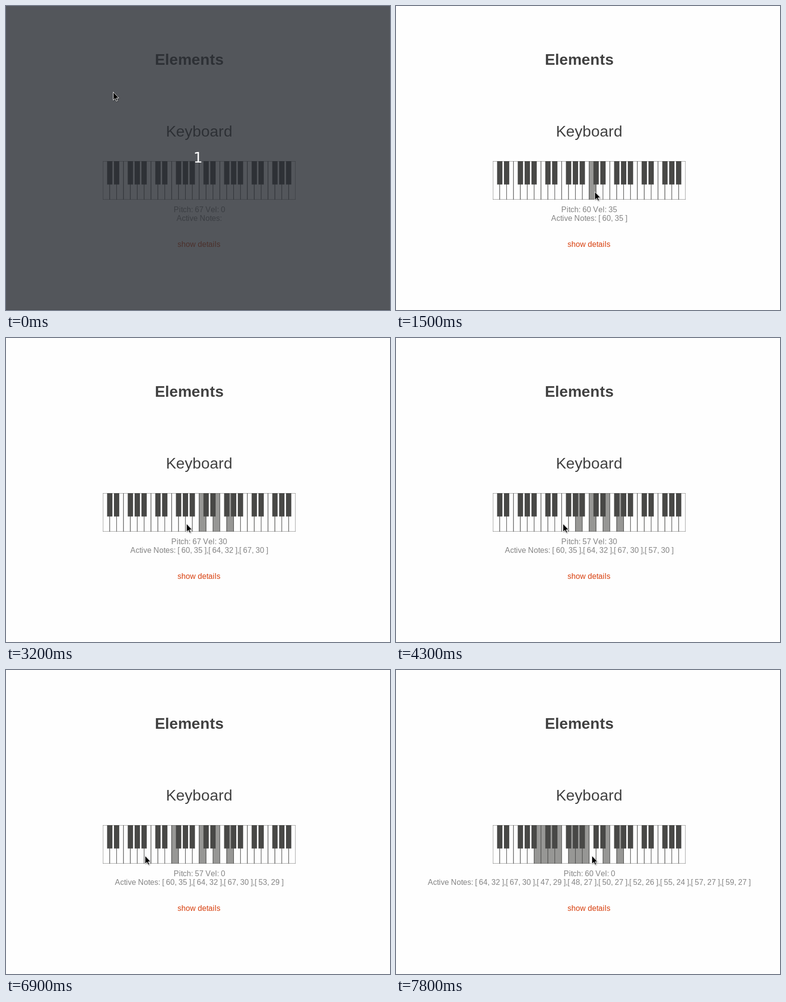
An HTML page with a canvas that plays this animation: 797x631 px, repeating every 8000 ms.

```html
<!DOCTYPE html>
<html lang="en">
<head>
<meta charset="utf-8">
<title>Keyboard element</title>
<style>
  html, body { margin: 0; width: 100%; height: 100%; overflow: hidden; background: #fefefe; }
  body { position: relative; }
  body > * { position: absolute; left: 0; top: 0; }
  #page text { font: 16px "Liberation Sans", Arial, sans-serif; fill: #848484; }
  #page .big { font-size: 32px; fill: #414141; }
  #page #title { font-weight: bold; }
  #page #link { fill: #d8400f; }
  #keys { left: 201px; top: 322px; }
  #veil { width: 100%; height: 100%; background: rgba(40, 44, 51, .8); box-shadow: inset 0 -1px #45484e; }
  #count { margin-top: 297px; text-align: center; font: 30px/36px "DejaVu Sans", sans-serif; color: #fff; }
  #arrow { overflow: visible; filter: drop-shadow(1px 1px 1px rgba(0, 0, 0, .35)); }
</style>
</head>
<body>
<svg id="page" width="797" height="631">
  <text id="title" class="big" y="122"></text>
  <text id="name" class="big" y="271"></text>
  <text id="pitch" y="428"></text>
  <text id="active" y="446"></text>
  <text id="link" y="500"></text>
</svg>
<canvas id="keys" width="400" height="80"></canvas>
<div id="veil"><div id="count">1</div></div>
<svg id="arrow" width="13" height="20">
  <path d="M-.4 -.4V16.4L3.5 12.9L6 18.5L8.6 17.4L6.2 12H11.3Z" fill="#000" stroke="#fff"/>
</svg>
<script>
const LOOP = 8000, STEP = 100, VEIL_END = 300, GLIDE = 7300;
const LEFT = 201, KEYS = 28, KEY_W = 400 / KEYS, LOW = 36, INK = "#484846";
const SCALE = [0, 2, 4, 5, 7, 9, 11];

// cursor path: leaving time, steps, x, y (the row of white keys by default)
const path = [
  [500, 4, 383, 333], [1000, 2, 408], [1500, 3, 424], [1900, 2, 436],
  [2400, 3, 470], [3000, 3, 375], [4100, 3, 347], [4800, 5, 377],
  [5800, 1, 350], [6000, 2, 383], [6700, 3, 289], [7400, 5, 407]
];

// clicks on the key under the cursor: time, velocity (0 releases it)
const clicks = [
  [1400, 35], [2300, 32], [2700, 30], [3900, 30], [4700, 29], [5800, 26], [6400, 0]
];
const glideVels = [29, 27, 27, 26, 24, 27, 27];

const el = id => document.getElementById(id);
const ctx = el("keys").getContext("2d");
const ruler = document.createElement("canvas").getContext("2d");

const pitchOf = i => LOW + 12 * Math.floor(i / 7) + SCALE[i % 7];
const keyAt = x => Math.floor((x + 1 - LEFT) / KEY_W);

// Centred text with every glyph on a whole pixel
function setText(id, text, centre = 401) {
  const node = el(id), style = getComputedStyle(node);
  ruler.font = `${style.fontWeight} ${style.fontSize} ${style.fontFamily}`;
  let width = 0;
  const xs = [...text].map(c => {
    const x = width;
    width += Math.round(ruler.measureText(c).width);
    return x;
  });
  const start = Math.round(centre - width / 2);
  node.setAttribute("x", xs.map(x => x + start).join(" "));
  node.textContent = text;
}

function drawKeys(lit) {
  const key = (x, w, h, fill) => {
    ctx.fillStyle = fill;
    ctx.fillRect(x, 0, w, h);
    ctx.strokeRect(x, 0, w, h);
  };
  ctx.clearRect(0, 0, 400, 80);
  ctx.strokeStyle = INK;
  for (let i = 0; i < KEYS; i++) {
    key(i * KEY_W, KEY_W, 80, lit.has(pitchOf(i)) ? "#979795" : "#fefefe");
  }
  for (let i = 0; i < KEYS; i++) {
    if (i % 7 !== 2 && i % 7 !== 6) key((i + 0.65) * KEY_W, 0.7 * KEY_W, 48, INK);
  }
}

function cursorAt(t) {
  let x = 223, y = 179;
  for (const [leave, steps, toX, toY = 386] of path) {
    if (t < leave) break;
    const p = Math.min(1, ((t - leave) / STEP + 1) / steps);
    x += (toX - x) * p;
    y += (toY - y) * p;
  }
  return [Math.round(x), Math.round(y)];
}

function notesAt(t) {
  const notes = new Map();
  let last = [67, 0];
  const play = (pitch, vel) => {
    notes.delete(pitch);
    if (vel) notes.set(pitch, vel);
    last = [pitch, vel];
  };
  for (const [time, vel] of clicks) {
    if (t >= time) play(pitchOf(keyAt(cursorAt(time - STEP)[0])), vel);
  }
  // Dragging flips every key on the way
  if (t >= GLIDE) {
    const end = keyAt(cursorAt(t)[0]);
    let n = 0;
    for (let i = keyAt(cursorAt(GLIDE)[0]); i <= end; i++) {
      const pitch = pitchOf(i);
      play(pitch, notes.has(pitch) ? 0 : glideVels[n++]);
    }
  }
  return { notes, last };
}

let shown = -1;
function render(t) {
  const now = Math.floor(t / STEP) * STEP;
  if (now === shown) return;
  shown = now;
  const [x, y] = cursorAt(now);
  const { notes, last } = notesAt(now);
  const list = [...notes].map(([p, v]) => `[ ${p}, ${v} ]`).join();
  el("arrow").style.transform = `translate(${x}px, ${y}px)`;
  el("veil").style.display = now < VEIL_END ? "block" : "none";
  setText("pitch", `Pitch: ${last[0]} Vel: ${last[1]}`);
  setText("active", `Active Notes: ${list}`.trim());
  drawKeys(notes);
}

setText("title", "Elements", 380.5);
setText("name", "Keyboard");
setText("link", "show details", 400.5);

const begin = performance.now();
function tick() {
  render((performance.now() - begin) % LOOP);
  requestAnimationFrame(tick);
}
tick();
</script>
</body>
</html>
```
